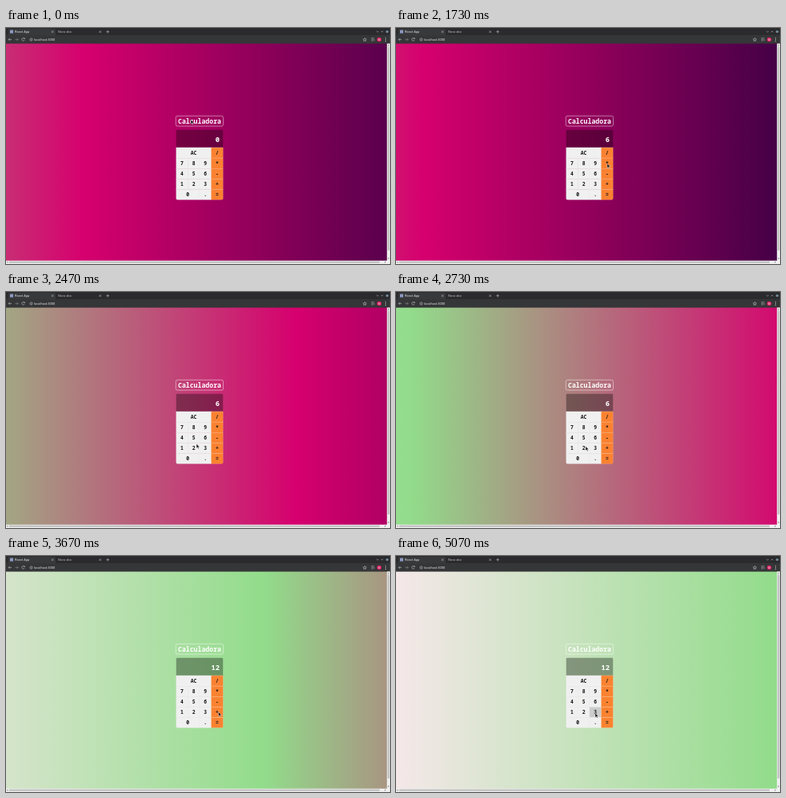
An HTML page for the animation above (5140 ms loop, 480 px wide and 296 px high).

```html
<!DOCTYPE html>
<html lang="pt">
<head>
<meta charset="utf-8">
<title>Calculadora</title>
<style>
  html, body { margin: 0; width: 100%; height: 100%; overflow: hidden; background: #2b2b2d; }
  svg { display: block; width: 100vw; height: 100vh; }
  .ui { font: 4px Roboto, sans-serif; fill: #e4e4e6; }
  .mono { font-family: "Noto Sans Mono", "DejaVu Sans Mono", monospace; font-weight: 700; }
  .line { fill: none; stroke: #b9babd; stroke-width: .65; }
</style>
</head>
<body>
<svg viewBox="0 0 480 296" xmlns="http://www.w3.org/2000/svg">
  <defs>
    <linearGradient id="sky" gradientUnits="userSpaceOnUse" y1="0" y2="0">
      <stop offset="0" stop-color="#f6e8ea"/>
      <stop offset=".33333" stop-color="#92dc8b"/>
      <stop offset=".66667" stop-color="#d6006e"/>
      <stop offset="1" stop-color="#390043"/>
    </linearGradient>
    <clipPath id="round"><rect x="212.5" y="127.5" width="59" height="88" rx="2"/></clipPath>
  </defs>

  <rect y="19" width="480" height="277" fill="url(#sky)"/>

  <!-- Browser bars -->
  <rect width="480" height="9.5" fill="#2b2b2d"/>
  <rect y="9" width="480" height="10.6" fill="#353638"/>
  <path d="M1 9.5Q2.500 9 2.500 7V2.500Q2.500 1 4 1H60.500Q62 1 62 2.500V7Q62 9 63.500 9.500Z" fill="#38393b"/>
  <rect x="5" y="2.600" width="4" height="4" fill="#8d9ac4"/>
  <g class="ui">
    <text x="11" y="6.300">React App</text>
    <text x="65" y="6.300" fill="#b9babd">Nova aba</text>
    <text x="35" y="15.900">localhost:3000</text>
  </g>
  <path class="line" d="M57 3.500l2.400 2.400m0-2.400l-2.400 2.400M116.500 3.500l2.400 2.400m0-2.400l-2.400 2.400M125.300 4.700h3.800m-1.900-1.900v3.800"/>
  <path class="line" d="M7 14.400H3.200m1.700-1.700l-1.700 1.700l1.700 1.700"/>
  <path class="line" stroke-opacity=".6" d="M11.400 14.400h3.800m-1.700-1.700l1.700 1.700l-1.700 1.700"/>
  <path class="line" d="M23 13.200a1.800 1.800 0 1 0 .2 1.900M23.300 12.200v1.400h-1.400"/>
  <circle class="line" cx="31.500" cy="14.500" r="1.600"/>
  <path class="line" d="M31.500 14.200v1.100"/>
  <path class="line" d="M448.500 12.500l.6 1.400 1.500.1-1.100 1 .3 1.500-1.300-.8-1.300.8.3-1.500-1.100-1 1.500-.1Z"/>
  <path class="line" d="M456.700 12.800h3.600m-3.600 1.600h2m-2 1.600h2m1.400-2v2.200"/>
  <circle cx="466.500" cy="14.500" r="2.800" fill="#d81b60"/>
  <text class="ui" x="466.500" y="15.700" text-anchor="middle" style="font-size:3.400px">M</text>
  <g fill="#c7c8ca">
    <circle cx="474.500" cy="12.600" r=".55"/><circle cx="474.500" cy="14.500" r=".55"/><circle cx="474.500" cy="16.400" r=".55"/>
  </g>
  <path class="line" d="M463.300 4l1.200 1.200L465.700 4M469 5.200l1.200-1.200l1.200 1.200"/>
  <circle cx="476.500" cy="4.600" r="1.700" fill="#718c9c"/>

  <!-- Scrollbars -->
  <path d="M476.200 19.600H480V296H0V291.700H476.200Z" fill="#f0f0f0"/>
  <rect x="476.900" y="23.500" width="2.500" height="255.500" fill="#c4c4c4"/>
  <rect x="4" y="292.500" width="463" height="2.500" fill="#c4c4c4"/>
  <path d="M1 293.700l1.500-1v2ZM475 293.700l-1.500-1v2ZM478.100 20.800l1 1.500h-2ZM478.100 290l1-1.500h-2Z" fill="#666"/>

  <rect x="212.300" y="110.300" width="59.200" height="12.800" rx="2" fill="none" stroke="#fff" stroke-opacity=".5" stroke-width=".9"/>
  <text class="mono" x="242" y="119.700" font-size="8.200" text-anchor="middle" fill="#fff">Calculadora</text>

  <g clip-path="url(#round)">
    <rect x="212.500" y="127.500" width="59" height="23" fill="#000" fill-opacity=".34"/>
    <g id="keys"></g>
  </g>
  <text id="display" class="mono" x="267" y="142.700" font-size="8.800" text-anchor="end" fill="#fff"></text>
  <path id="cursor" d="M0 0V5.400L1.300 4.300L2.200 6.300L3.100 5.900L2.200 4H3.900Z" fill="#111" stroke="#fff" stroke-width=".4"/>
</svg>
<script>
const LOOP = 5140, FPS = 15;
const HALF = 4000, TURN = 1522;   // gradient sweep and the moment it turns back
const STOP = 480;                 // distance between gradient colours
const LEFT = 212.5, TOP = 150, COL = 14.7, ROW = 13.15;
const $ = id => document.getElementById(id);

function add(parent, tag, attrs, text = "") {
  const node = document.createElementNS("http://www.w3.org/2000/svg", tag);
  for (const name in attrs) node.setAttribute(name, attrs[name]);
  node.textContent = text;
  parent.append(node);
  return node;
}

const keys = {};
function addKey(label, col, row, span = 1) {
  const x = LEFT + col * COL, y = TOP + row * ROW, operator = col === 3;
  const fill = operator ? "#fa8231" : "#f0f0f0";
  const box = add($("keys"), "rect", {
    x, y, width: COL * span + .2, height: ROW, fill,
    stroke: operator ? "#ffc08f" : "#e8e8e8", "stroke-width": .45
  });
  add($("keys"), "text", {
    class: "mono", x: x + COL * span / 2, y: y + ROW / 2 + 2.3,
    "font-size": 6.4, "text-anchor": "middle", fill: "#151515"
  }, label);
  keys[label] = { box, fill, pressed: operator ? "#fb9b5a" : "#ccc" };
}

addKey("AC", 0, 0, 3);
["789", "456", "123"].forEach((digits, r) => [...digits].forEach((d, c) => addKey(d, c, r + 1)));
addKey("0", 0, 4, 2);
addKey(".", 2, 4);
[..."/*-+="].forEach((op, r) => addKey(op, 3, r));

// key, press time, release time, display after release
const presses = [
  ["6", 950, 1050, "6"], ["*", 1780, 1870, "6"], ["2", 2760, 2860, "2"],
  ["=", 3300, 3400, "12"], ["/", 4240, 4340, "12"], ["3", 5040, 5200, "3"]
];

// time, x, y of the pointer tip
const path = [
  [0, 231, 115], [250, 232, 119], [850, 249, 181], [1150, 249, 181], [1620, 264, 170],
  [1880, 264, 170], [2270, 240, 185], [2600, 237, 193.5], [2870, 237, 193.5],
  [3200, 268.5, 208], [3450, 267, 208], [4130, 261, 156], [4370, 261, 156],
  [4900, 249, 197], [5140, 249, 197]
];

// cubic-bezier(.25, .1, .25, 1)
function ease(x) {
  const curve = (s, a, b) => 3 * a * s * (1 - s) ** 2 + 3 * b * s * s * (1 - s) + s ** 3;
  let lo = 0, hi = 1;
  for (let i = 0; i < 24; i++) {
    const mid = (lo + hi) / 2;
    if (curve(mid, .25, .25) < x) lo = mid; else hi = mid;
  }
  return curve(lo, .1, 1);
}

function pointerAt(t) {
  const i = Math.max(1, path.findIndex(p => p[0] >= t));
  const [t0, x0, y0] = path[i - 1], [t1, x1, y1] = path[i];
  const u = (t - t0) / (t1 - t0), s = u * u * (3 - 2 * u);
  return [x0 + (x1 - x0) * s, y0 + (y1 - y0) * s];
}

function draw(t) {
  const shift = t < TURN ? ease((t - TURN + HALF) / HALF) : 1 - ease((t - TURN) / HALF);
  const start = -2 * STOP * shift;
  $("sky").setAttribute("x1", start);
  $("sky").setAttribute("x2", start + 3 * STOP);

  let shown = "0";
  for (const [label, down, up, result] of presses) {
    const key = keys[label];
    key.box.setAttribute("fill", t >= down && t < up ? key.pressed : key.fill);
    if (t >= up) shown = result;
  }
  $("display").textContent = shown;
  $("cursor").setAttribute("transform", `translate(${pointerAt(t)})`);
}

const began = performance.now();
function tick() {
  const t = (performance.now() - began) % LOOP;
  draw(Math.floor((t + 4) * FPS / 1000) * 1000 / FPS);
  requestAnimationFrame(tick);
}
tick();
</script>
</body>
</html>
```
